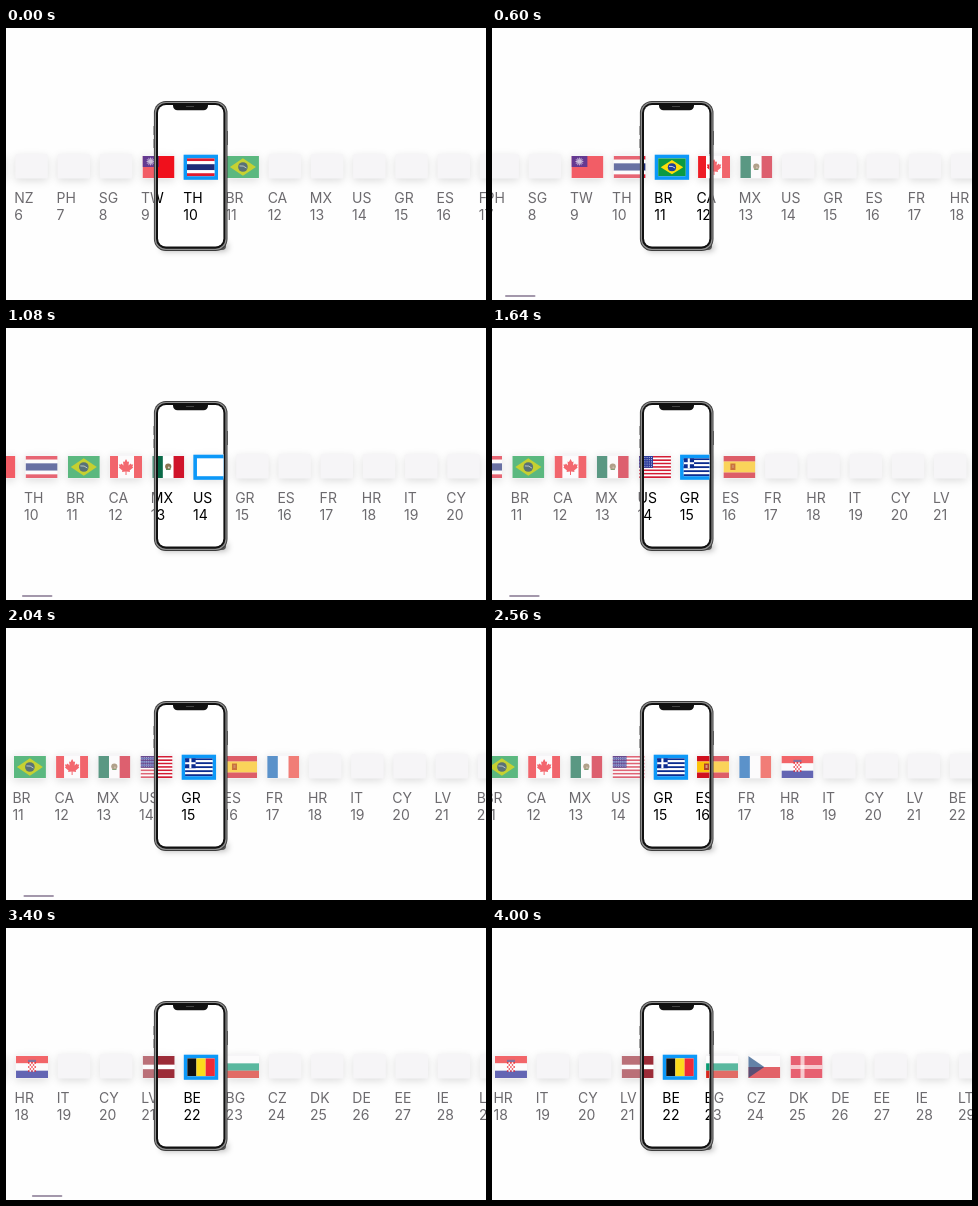
Write an HTML page with a canvas that moves like this. It is 480 by 272 pixels and loops after 4040 ms.

```html
<!DOCTYPE html>
<html lang="en">
<head>
<meta charset="utf-8">
<title>Country strip</title>
<style>
  html, body { margin: 0; width: 100%; height: 100%; overflow: hidden; background: #fff; }
  canvas { display: block; width: 480px; height: 272px; }
</style>
</head>
<body>
<canvas id="stage"></canvas>
<script>
const LOOP = 4040, W = 480, H = 272, PITCH = 42.22, FIRST = 5;
const CODES = 'AU NZ PH SG TW TH BR CA MX US GR ES FR HR IT CY LV BE BG CZ DK DE EE IE LT FI'.split(' ');

// Strip offset over time: [ms, px]
const SCROLL = [
  [0, -244], [60, -244], [200, -263], [400, -289], [600, -301],
  [740, -332], [900, -371], [1080, -403], [1300, -425], [1600, -443],
  [2040, -457], [2360, -471], [2560, -471], [2640, -508], [2740, -585],
  [2860, -670], [3000, -721], [3200, -742], [3500, -753], [3800, -757.5], [4040, -757.5]
];

// When each flag picture arrives, ms
const LOADED = {
  TW: -999, TH: -999, BR: -999, CA: 280, MX: 440, US: 1160, GR: 1360, ES: 1480,
  FR: 1680, HR: 2200, LV: 3080, BE: 3200, BG: 3320, CZ: 3480, DK: 3680
};

const canvas = document.getElementById('stage');
const dpr = window.devicePixelRatio || 1;
canvas.width = W * dpr;
canvas.height = H * dpr;
const c = canvas.getContext('2d');

const clamp = v => Math.max(0, Math.min(1, v));
const ramp = (t, a, b) => clamp((t - a) / (b - a));

// Monotone cubic interpolation through the scroll table
const slopes = SCROLL.map((p, i) => {
  if (!i || i === SCROLL.length - 1) return 0;
  const a = SCROLL[i - 1], b = SCROLL[i + 1];
  const l = (p[1] - a[1]) / (p[0] - a[0]), r = (b[1] - p[1]) / (b[0] - p[0]);
  return l * r > 0 ? 2 * l * r / (l + r) : 0;
});

function offsetAt(t) {
  let i = 0;
  while (i < SCROLL.length - 2 && t > SCROLL[i + 1][0]) i++;
  const [t0, x0] = SCROLL[i], [t1, x1] = SCROLL[i + 1];
  const d = t1 - t0, u = clamp((t - t0) / d), v = 1 - u;
  return x0 * v * v * (1 + 2 * u) + x1 * u * u * (3 - 2 * u)
    + d * u * v * (slopes[i] * v - slopes[i + 1] * u);
}

function rect(color, x, y, w, h) {
  c.fillStyle = color;
  c.fillRect(x, y, w, h);
}

function dot(color, x, y, r) {
  c.fillStyle = color;
  c.beginPath();
  c.arc(x, y, r, 0, 7);
  c.fill();
}

function poly(color, ...p) {
  c.fillStyle = color;
  c.beginPath();
  for (let i = 0; i < p.length; i += 2) c.lineTo(p[i], p[i + 1]);
  c.fill();
}

function pill(color, x, y, w, h, r) {
  c.fillStyle = color;
  c.beginPath();
  c.roundRect(x, y, w, h, r);
  c.fill();
}

function shadow(alpha, blur, dx, dy, draw) {
  c.save();
  c.shadowColor = `rgba(0,0,0,${alpha})`;
  c.shadowBlur = blur * dpr;
  c.shadowOffsetX = dx * dpr;
  c.shadowOffsetY = dy * dpr;
  draw();
  c.restore();
}

// Stripes as [colour, weight] pairs
function stripes(list, upright) {
  const total = list.reduce((s, b) => s + b[1], 0);
  let at = 0;
  for (const [color, n] of list) {
    const a = at / total, b = n / total;
    if (upright) rect(color, a * 32, 0, b * 32, 22);
    else rect(color, 0, a * 22, 32, b * 22);
    at += n;
  }
}

const columns = (...colors) => stripes(colors.map(k => [k, 1]), true);
const rows = (...colors) => stripes(colors.map(k => [k, 1]));

// Flags on a 32 x 22 field
const FLAGS = {
  TW() {
    rect('#f0101c', 0, 0, 32, 22);
    rect('#1c26a8', 0, 0, 16, 11);
    for (let i = 0; i < 12; i++) {
      const a = i * Math.PI / 6, px = (k, r) => 8 + Math.cos(a + k) * r, py = (k, r) => 5.5 + Math.sin(a + k) * r;
      poly('#fff', px(0, 4.6), py(0, 4.6), px(.3, 2.4), py(.3, 2.4), px(-.3, 2.4), py(-.3, 2.4));
    }
    dot('#fff', 8, 5.5, 2.3);
  },
  TH() { stripes([['#e01c30', 1], ['#fff', 1], ['#1f2c78', 2], ['#fff', 1], ['#e01c30', 1]]); },
  BR() {
    rect('#0b9a42', 0, 0, 32, 22);
    poly('#fddd0a', 3, 11, 16, 2.3, 29, 11, 16, 19.7);
    dot('#20409a', 16, 11, 4.8);
    c.strokeStyle = '#fff';
    c.lineWidth = .9;
    c.beginPath();
    c.arc(14, 18, 8.2, -1.75, -.82);
    c.stroke();
  },
  CA() {
    stripes([['#ee1c25', 1], ['#fff', 2], ['#ee1c25', 1]], true);
    const half = [0, -8, 1.6, -5, 3, -5.6, 2.5, -1.6, 4.6, -3.6, 5.2, -2.4, 7.2, -2.6, 6.4, -.2, 7.2, .6, 3.6, 3.6, 4, 5, .5, 4.6, .5, 8];
    const left = [];
    for (let i = half.length - 2; i >= 0; i -= 2) left.push(16 - half[i], 11 + half[i + 1]);
    poly('#ee1c25', ...half.map((v, i) => v + (i % 2 ? 11 : 16)), ...left);
  },
  MX() {
    columns('#0a6a48', '#fff', '#d0142a');
    dot('#8b7350', 16, 10.5, 3.1);
    dot('#d8cfc0', 16.6, 11.4, 1);
    rect('#5f8b55', 13.8, 13, 4.4, 1);
  },
  US() {
    for (let i = 0; i < 13; i++) rect(i % 2 ? '#fff' : '#d41c34', 0, i * 22 / 13, 32, 22 / 13);
    rect('#2c3c9c', 0, 0, 14, 22 * 7 / 13);
    for (let y = 0; y < 5; y++) for (let x = 0; x < 6; x++) rect('#fff', 1.1 + x * 2.2, 1.1 + y * 2.2, .8, .8);
  },
  GR() {
    const h = 22 / 9, blue = '#0c2c90';
    for (let i = 0; i < 9; i++) rect(i % 2 ? '#fff' : blue, 0, i * h, 32, h);
    rect(blue, 0, 0, 12.2, h * 5);
    rect('#fff', 0, h * 2, 12.2, h);
    rect('#fff', 4.9, 0, h, h * 5);
  },
  ES() {
    stripes([['#d0101f', 1], ['#fcc30a', 2], ['#d0101f', 1]]);
    rect('#b0402c', 7, 7.5, 5, 6.5);
    rect('#d89a7a', 8.5, 9, 2, 3);
  },
  FR() { columns('#0b60b4', '#fff', '#ef4136'); },
  HR() {
    rows('#f01c20', '#fff', '#181c90');
    for (let y = 0; y < 5; y++) for (let x = 0; x < 5; x++)
      rect((x + y) % 2 ? '#fff' : '#e8202a', 12 + x * 1.6, 6 + y * 2, 1.6, 2);
    rect('#4a78b8', 12, 3.8, 8, 2.2);
  },
  LV() { stripes([['#9c2c38', 2], ['#fff', 1], ['#9c2c38', 2]]); },
  BE() { columns('#111', '#fcdc1c', '#ee2b38'); },
  BG() { rows('#fff', '#0a9a72', '#d8261c'); },
  CZ() {
    rows('#fff', '#d8181f');
    poly('#15457c', 0, 0, 16, 11, 0, 22);
  },
  DK() {
    rect('#e0142c', 0, 0, 32, 22);
    rect('#fff', 10, 0, 4, 22);
    rect('#fff', 0, 9, 32, 4);
  }
};

function drawCard(x) {
  shadow(.13, 9, 0, 2.5, () => pill('#f6f5f7', x, 126, 32.5, 24.5, 1.5));
}

// The selected flag shrinks to sit inside its frame
function drawFlag(code, x, t, alpha, selected) {
  const shown = ramp(t, LOADED[code], LOADED[code] + 80);
  if (!shown) return;
  c.save();
  c.globalAlpha = alpha * shown;
  if (selected) {
    c.translate(x + 2.8, 130.2);
    c.scale(.865, .82);
  } else c.translate(x + .5, 128);
  c.beginPath();
  c.rect(0, 0, 32, 22);
  c.clip();
  FLAGS[code]();
  c.restore();
}

function drawFrame(x) {
  rect('#0c98f8', x - .6, 126.7, 34.4, 25.1);
  rect('#fff', x + 3, 130.3, 27.2, 17.9);
}

function drawStrip(t, base, inPhone) {
  const chosen = Math.round((168 - base) / PITCH);
  const items = CODES.map((code, i) => ({ code, n: i + FIRST, x: base + (i + FIRST) * PITCH }))
    .filter(o => o.x > -50 && o.x < W + 10);
  items.forEach(o => drawCard(o.x));
  c.font = '14px Inter, Roboto, sans-serif';
  for (const { code, n, x } of items) {
    const selected = inPhone && n === chosen;
    if (selected) drawFrame(x);
    if (FLAGS[code]) drawFlag(code, x, t, inPhone ? 1 : .66, selected);
    c.fillStyle = inPhone ? '#000' : '#6c6a6e';
    c.fillText(code, x - 1, 175);
    c.fillText(n, x - 1, 191.7);
  }
}

function drawPhone(t, base) {
  shadow(.3, 6, 2, 1, () => pill('#555', 153, 214, 67, 8, 4));
  rect('#777', 147.4, 98, 1, 9);
  rect('#777', 147.4, 111, 1, 9);
  rect('#777', 221, 103, 1, 14);
  pill('#3c3c3c', 147.9, 73, 73.6, 150, 12);
  pill('#909090', 148.8, 73.9, 71.8, 148.2, 11.2);
  pill('#111', 150, 75, 69.4, 145.8, 10);

  c.save();
  c.beginPath();
  c.roundRect(152, 77, 65.4, 141.6, 8);
  c.clip();
  rect('#fff', 150, 74, 70, 148);
  drawStrip(t, base, true);
  c.restore();

  pill('#111', 167, 76, 35, 6.2, [0, 0, 4.5, 4.5]);
  rect('#444', 180, 78, 8, 1);
}

function drawIndicator(t, base) {
  const first = ramp(t, 80, 180) * (1 - ramp(t, 2320, 2520));
  const second = ramp(t, 2580, 2660) * (1 - ramp(t, 3700, 3900));
  c.globalAlpha = Math.max(first, second);
  pill('#a397ab', 13 + (-301 - base) * .0286, 267, 30.5, 2, 1);
  c.globalAlpha = 1;
}

function frame(now) {
  const t = now % LOOP, base = offsetAt(t);
  c.setTransform(dpr, 0, 0, dpr, 0, 0);
  rect('#fefefe', 0, 0, W, H);
  drawStrip(t, base, false);
  drawPhone(t, base);
  drawIndicator(t, base);
  requestAnimationFrame(() => frame(performance.now()));
}

frame(performance.now());
</script>
</body>
</html>
```
